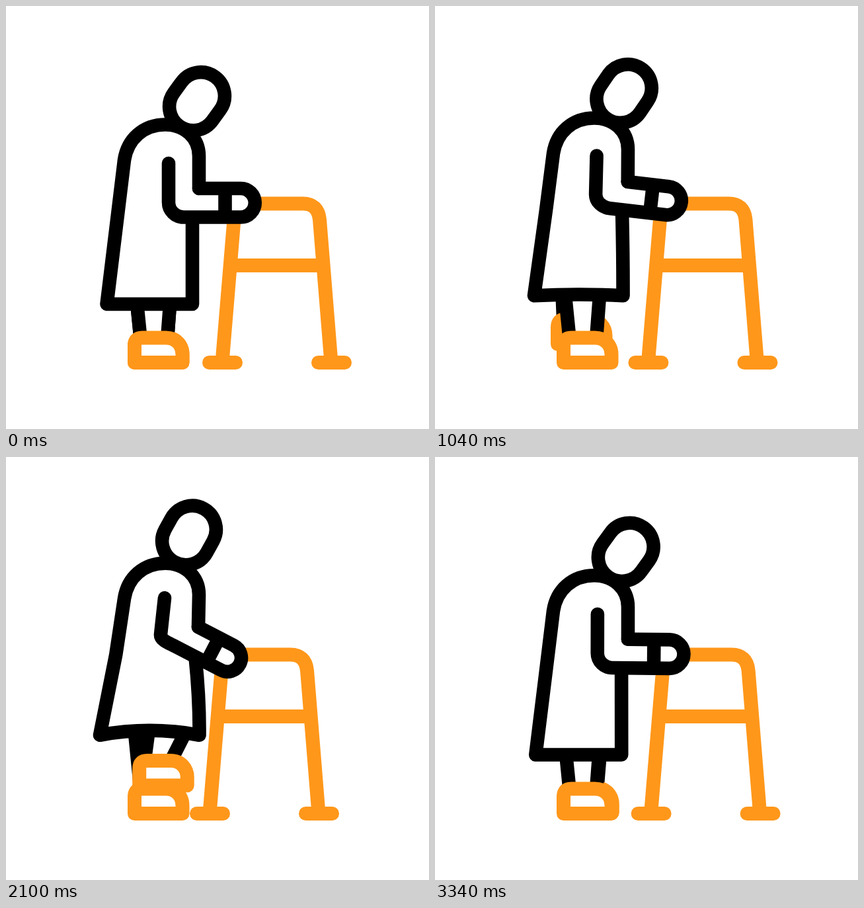
An HTML page that plays this animation: 640x640 px, repeating every 3360 ms.

```html
<!DOCTYPE html>
<html lang="en">
<head>
<meta charset="utf-8">
<title>Walking with a frame</title>
<style>
  html, body { margin: 0; width: 100%; height: 100%; overflow: hidden; background: #fff; }
  svg { display: block; width: 100vw; height: 100vh; }
  path, rect { fill: none; stroke: #000; stroke-width: 20.6; stroke-linejoin: round; }
  .round { stroke-linecap: round; }
  .orange { stroke: #ff971a; stroke-width: 21; }
  .white { fill: #fff; }
  .mask { fill: #fff; stroke: none; }
</style>
</head>
<body>
<svg viewBox="0 0 640 640">
  <defs>
    <path id="shoe" class="orange white" d="M194.5 539.5V514Q194.5 502 206 502H242C258 502 267 514 267 527V539.5Z"/>
  </defs>
  <g id="back"><path class="mask"/><path/><use href="#shoe"/></g>
  <g id="front"><path class="mask"/><path/><use href="#shoe"/></g>
  <g id="walker">
    <path class="orange" d="M327 539.5L345 323Q347 299 370 299H449Q472 299 474.5 323L492 539.5M340 392.5H479"/>
    <path class="orange round" d="M307.5 539.5H347.5M472.5 539.5H512.5"/>
  </g>
  <path id="coat" class="white round"/>
  <path id="forearm" class="mask"/>
  <path id="arm" class="round"/>
  <path id="wrist"/>
  <rect id="head" x="-36" y="-46" width="72" height="92" rx="36"/>
</svg>
<script>
const STEP = 840;
// phase, lift, bend, foot x, foot lift
const KEYS = [
  [0, 0, 0, 0, 0],
  [80, 2, 0, -5, 8],
  [200, 10, .24, -9, 28],
  [380, 18, .91, 5, 42],
  [440, 18.3, 1.02, 8, 42],
  [500, 13.3, 1, 9.3, 39],
  [560, 7.8, .9, 10, 33],
  [660, 3.2, .55, 8.5, 21],
  [780, 1.2, .11, 4, 8],
  [820, .2, .02, 1.3, 1.5]
];
const $ = id => document.getElementById(id);
const count = KEYS.length;

function key(i) {
  const turn = Math.floor(i / count);
  const [p, ...rest] = KEYS[i - turn * count];
  return [p + turn * STEP, ...rest];
}

// Smooth cyclic curve through the keys
function pose(p) {
  let i = count - 1;
  while (KEYS[i][0] > p) i--;
  const [a, b, c, d] = [-1, 0, 1, 2].map(n => key(i + n));
  const span = c[0] - b[0], u = (p - b[0]) / span;
  return [1, 2, 3, 4].map(k => {
    const m = (c[k] - a[k]) / (c[0] - a[0]) * span;
    const n = (d[k] - b[k]) / (d[0] - b[0]) * span;
    const diff = c[k] - b[k];
    return b[k] + u * (m + u * (3 * diff - 2 * m - n + u * (m + n - 2 * diff)));
  });
}

function drawLeg(id, x, y, top, lean) {
  const [mask, lines, shoe] = $(id).children;
  const slope = (498 - top) / 60;
  const l0 = `${203 + x - 6 * slope + 14 * lean} ${top - y}`;
  const l1 = `${203 + x} ${498 - y}`;
  const r0 = `${244.5 + x + 4.5 * slope + 26 * lean} ${top - y}`;
  const r1 = `${244.5 + x} ${498 - y}`;
  mask.setAttribute('d', `M${l0}L${l1}L${r1}L${r0}Z`);
  lines.setAttribute('d', `M${l0}L${l1}M${r0}L${r1}`);
  shoe.setAttribute('transform', `translate(${x} ${-y})`);
}

function drawCoat(v, s, front) {
  const hem = 451 - v - 11.5 * s;
  const left = 152.5 - 10.5 * s, right = 282 + 10.5 * s;
  $('coat').setAttribute('d',
    `M${front} ${276 - v}L292 ${227 - v}` +
    `C292 ${199 - v} 270 ${179.5 - v} 241 ${179.5 - v}` +
    `C208 ${179.5 - v} 184 ${201 - v} 179 ${233 - v}` +
    `L${168.7 - 2.5 * s} ${318 - v}` +
    `L${left} ${hem}Q${(left + right) / 2} ${hem - 14 * s} ${right} ${hem}` +
    `Q${282 + 11 * s} ${390 - v - 5 * s} ${282 + 4.5 * s} ${322 - v}`);
}

// The forearm turns about the front corner of the coat
function drawArm(v, s, front) {
  const angle = 27.5 * s * Math.PI / 180;
  const cos = Math.cos(angle), sin = Math.sin(angle);
  const turn = (x, y) =>
    `${front + x * cos - y * sin} ${276 - v + x * sin + y * cos}`;
  const width = 43.5 - 1.5 * s, length = 63 - 2.5 * s;
  const wrist = 39.5 - 4 * s, bend = -23 + 4 * s;
  const elbowX = 246 - 12 * s, elbowY = 297 - v - 10 * s;
  const curve = 12.7 - 4 * s;
  const hand = `L${turn(length, width)}` +
    `A${width / 2} ${width / 2} 0 0 0 ${turn(length, 0)}L${turn(0, 0)}`;
  $('forearm').setAttribute('d', `M${turn(0, width)}${hand}Z`);
  $('arm').setAttribute('d',
    `M${246 - 6 * s} ${238 - v - 6 * s}L${elbowX} ${elbowY}` +
    `C${elbowX - .1 * curve * s} ${elbowY + curve} ` +
    `${turn(bend - curve, width)} ${turn(bend, width)}${hand}`);
  $('wrist').setAttribute('d', `M${turn(wrist, 0)}L${turn(wrist, width)}`);
}

function draw(time) {
  const t = time % (2 * STEP);
  const [v, s, fx, fy] = pose(t % STEP);
  const first = t < STEP;
  const front = 292 - s;
  drawLeg(first ? 'front' : 'back', fx, fy, 438, s);
  drawLeg(first ? 'back' : 'front', 0, 0, 415, 0);
  drawCoat(v, s, front);
  drawArm(v, s, front);
  $('walker').setAttribute('transform', `translate(${-19 * s} 0)`);
  $('head').setAttribute('transform',
    `translate(${289 - 12 * s} ${144.2 - v - 7 * s}) rotate(${36 - 7 * s})`);
}

let start;
function tick(now) {
  start ??= now;
  draw(now - start);
  requestAnimationFrame(tick);
}
draw(0);
requestAnimationFrame(tick);
</script>
</body>
</html>
```
